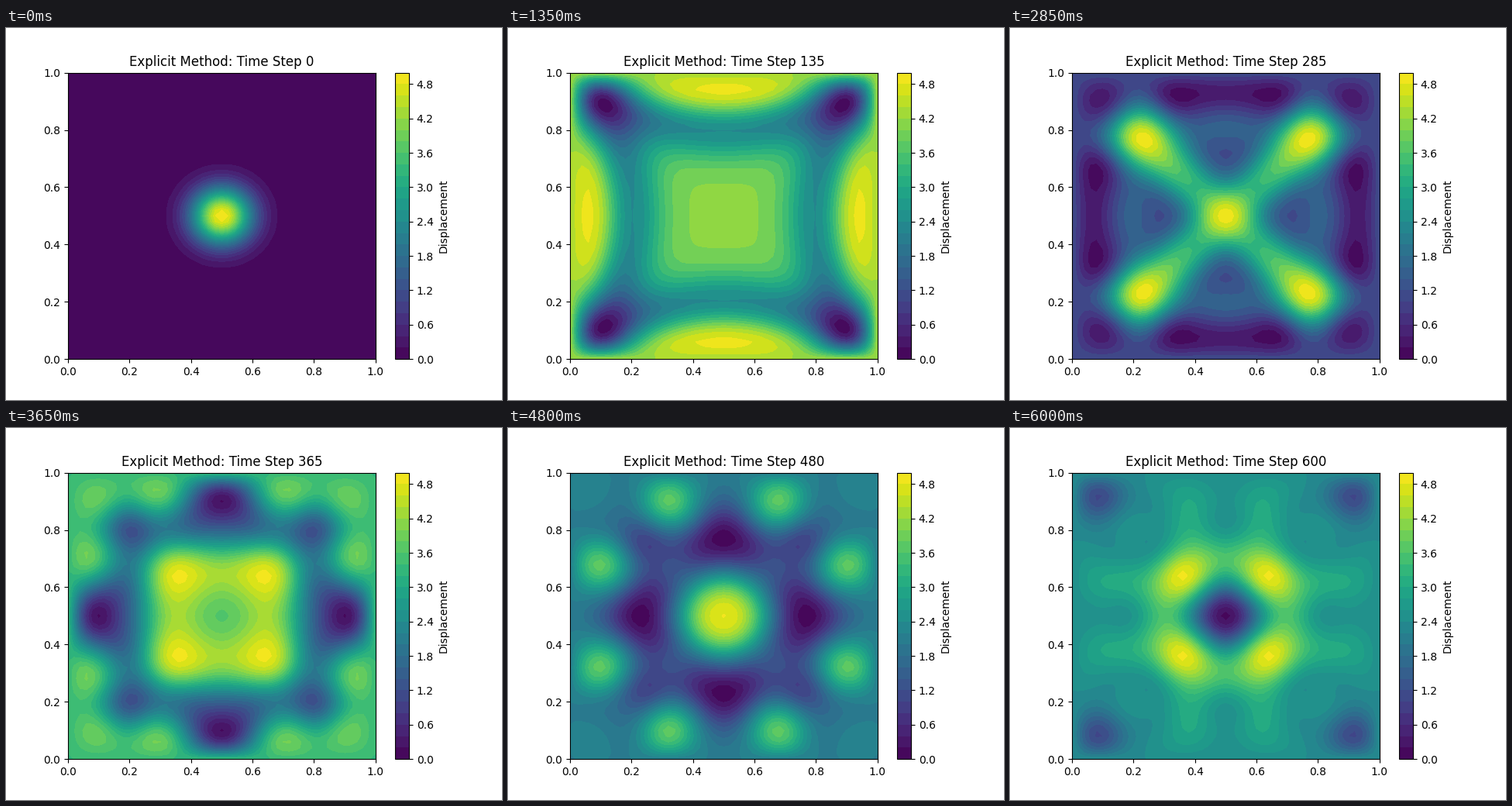
A matplotlib script that plays this animation: 640x480 px, repeating every 6.05 s.

```python
import numpy as np
import matplotlib.pyplot as plt
from matplotlib.animation import FuncAnimation

# 2D wave equation on the unit square, fixed edges, explicit scheme
N = 51
C, DT = 1.0, 0.005
STRIDE, FRAMES, LEVELS = 5, 121, 25

x = np.linspace(0, 1, N)
X, Y = np.meshgrid(x, x)
R2 = (C * DT / (x[1] - x[0])) ** 2


def simulate(steps):
    u = 5 * np.exp(-100 * ((X - 0.5) ** 2 + (Y - 0.5) ** 2))
    prev = u.copy()
    history = [u]
    for _ in range(steps):
        new = np.zeros_like(u)
        lap = (u[2:, 1:-1] + u[:-2, 1:-1] + u[1:-1, 2:] + u[1:-1, :-2]
               - 4 * u[1:-1, 1:-1])
        new[1:-1, 1:-1] = 2 * u[1:-1, 1:-1] - prev[1:-1, 1:-1] + R2 * lap
        prev, u = u, new
        history.append(u)
    return history


history = simulate(STRIDE * (FRAMES - 1))

fig, ax = plt.subplots(figsize=(6.4, 4.8), dpi=100)


def draw(i):
    step = i * STRIDE
    ax.clear()
    ax.set_title(f"Explicit Method: Time Step {step}")
    return ax.contourf(X, Y, history[step], levels=LEVELS, cmap="viridis")


fig.colorbar(draw(0), ax=ax, label="Displacement")

anim = FuncAnimation(fig, draw, frames=FRAMES, interval=50,
                     init_func=lambda: None, repeat=True, repeat_delay=0)
plt.show()
```
